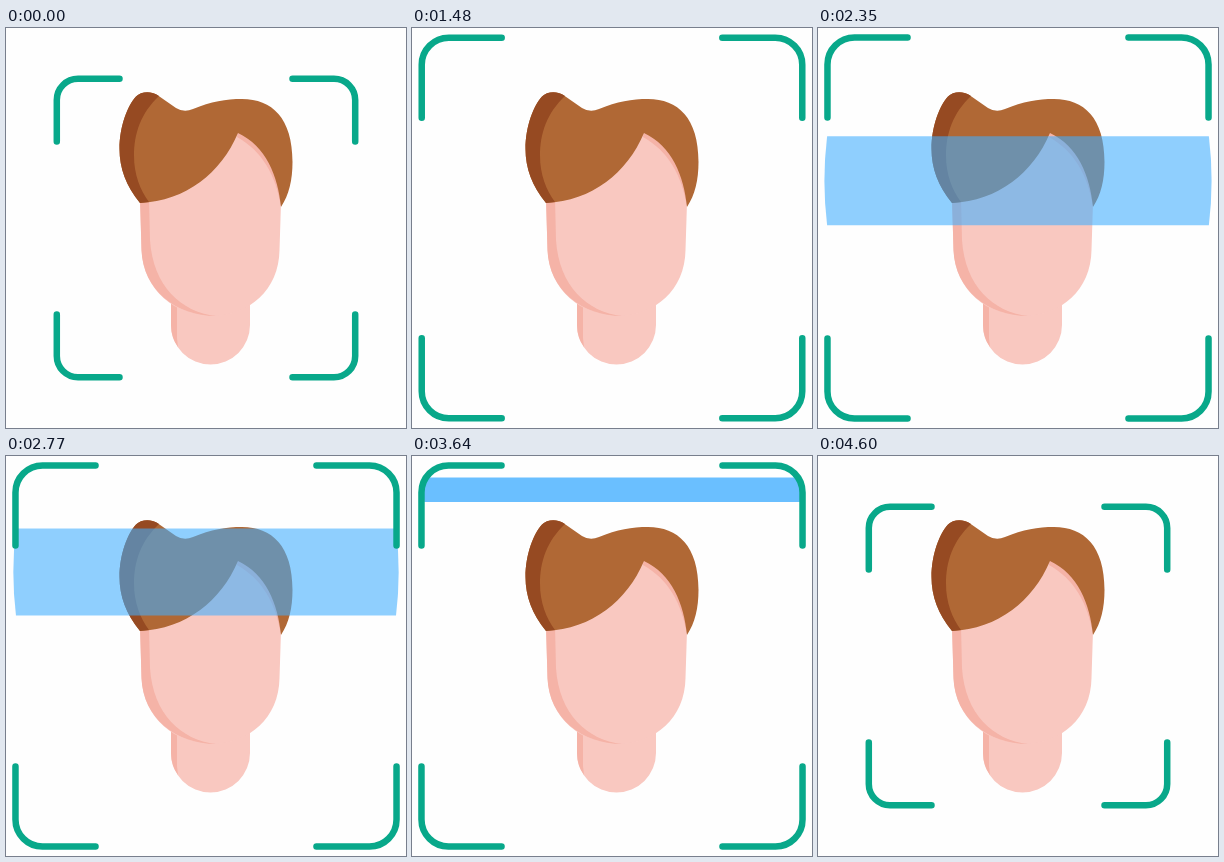
An HTML page for the animation above (4630 ms loop, 400 px wide and 400 px high).

```html
<!DOCTYPE html>
<html lang="en">
<head>
<meta charset="utf-8">
<title>Face scan</title>
<style>
  html, body { margin: 0; width: 100%; height: 100%; overflow: hidden; background: #fefefe; }
  svg { display: block; width: 100%; height: 100%; }
</style>
</head>
<body>
<svg viewBox="0 0 400 400">
  <g id="head">
    <path fill="#f9c8c0" d="M165 265V297A39.5 39.5 0 0 0 244 297V265Z"/>
    <path fill="#f5b3a7" d="M165 270V297Q165 310 172 319Q170.5 310 171 300V276Z"/>
    <path fill="#f9c8c0" d="M134 170L135.500 222C137 262 170 288 204.500 288C243 288 273 262 273.500 222L275 175V120L232 95Z"/>
    <path fill="#f5b3a7" d="M134 170L135.500 222C137 262 170 288 210 288C175 284 147 258 144 212L143 170Z"/>
    <path fill="#f5b3a7" d="M232 103C260 114 273 143 275 179C270 147 256 123 231 109Z"/>
    <path fill="#b06835" d="M134 175C120 158 113.500 140 113.500 121C113.500 98 122 77 130 68.500C135 63.500 145 62.500 152 67.500L170 80Q178 85 187 81C205 73.500 220 71 236 71C266 71 286.500 90 286.500 134C286.500 152 283 167 275 179C272 148 260 118 232 105C215 145 180 173 134 175Z"/>
    <path fill="#964a22" d="M134 175C120 158 113.500 140 113.500 121C113.500 98 122 77 130 68.500C135 63.500 145 62.500 153 68C135 85 128 105 128 128C128 146 134 162 143 174Z"/>
  </g>
  <path id="beam" fill="#41aeff"/>
  <path id="frame" fill="none" stroke="#08a88a" stroke-width="6.500" stroke-linecap="round"/>
</svg>
<script>
const LOOP = 4630;
const SCAN_START = 1638.7, SWEEP = 464.8, SWEEPS = 5, SWEEP_POWER = 4.25;
const beam = document.getElementById('beam');
const frame = document.getElementById('frame');

const clamp = x => Math.min(1, Math.max(0, x));
const ramp = (x, from, to) => clamp((x - from) / (to - from));
const smooth = x => x * x * (3 - 2 * x);
const easeInOut = (x, power) =>
  x < .5 ? (2 * x) ** power / 2 : 1 - (2 - 2 * x) ** power / 2;

function drawFrame(t) {
  const open = easeInOut(ramp(t, 1030, 1540), 3) - easeInOut(ramp(t, 4080, 4600), 3);
  const scale = 1 + .277 * open;
  const edge = 149.2 * scale, bend = 128 * scale, tip = 86.5 * scale;
  let d = '';
  for (const sx of [-1, 1]) for (const sy of [-1, 1]) {
    const at = (x, y) => `${200 + sx * x} ${200 + sy * y}`;
    const r = edge - bend, turn = sx * sy > 0 ? 1 : 0;
    d += `M${at(edge, tip)}L${at(edge, bend)}A${r} ${r} 0 0 ${turn} ${at(bend, edge)}L${at(tip, edge)}`;
  }
  frame.setAttribute('d', d);
}

function drawBeam(t) {
  const phase = Math.min(SWEEPS - 1e-6, Math.max(0, (t - SCAN_START) / SWEEP));
  const sweep = Math.floor(phase), u = phase - sweep;
  const progress = easeInOut(u, SWEEP_POWER);
  const y = 9.5 + 381 * (sweep % 2 ? 1 - progress : progress);

  // The beam swells into a translucent band halfway through each sweep.
  const swell = 1 - Math.abs(2 * u - 1);
  const tall = smooth(ramp(swell, .49, .91));
  const h = 3.3 + 41.2 * tall;
  const w = 160 + 34.5 * swell ** .4 - 2.7 * tall;
  const bulge = w + 5.4 * tall;
  const shown = ramp(t, 1520, 1610) - ramp(t, 4040, 4140);

  beam.setAttribute('d',
    `M${200 - w} ${y - h}H${200 + w}Q${200 + bulge} ${y} ${200 + w} ${y + h}` +
    `H${200 - w}Q${200 - bulge} ${y} ${200 - w} ${y - h}Z`);
  beam.setAttribute('opacity', shown * (1 - .42 * smooth(ramp(swell, .38, .84))));
}

function render(now) {
  const t = now % LOOP;
  drawFrame(t);
  drawBeam(t);
}

const start = performance.now();
function tick() {
  render(performance.now() - start);
  requestAnimationFrame(tick);
}
tick();
</script>
</body>
</html>
```
